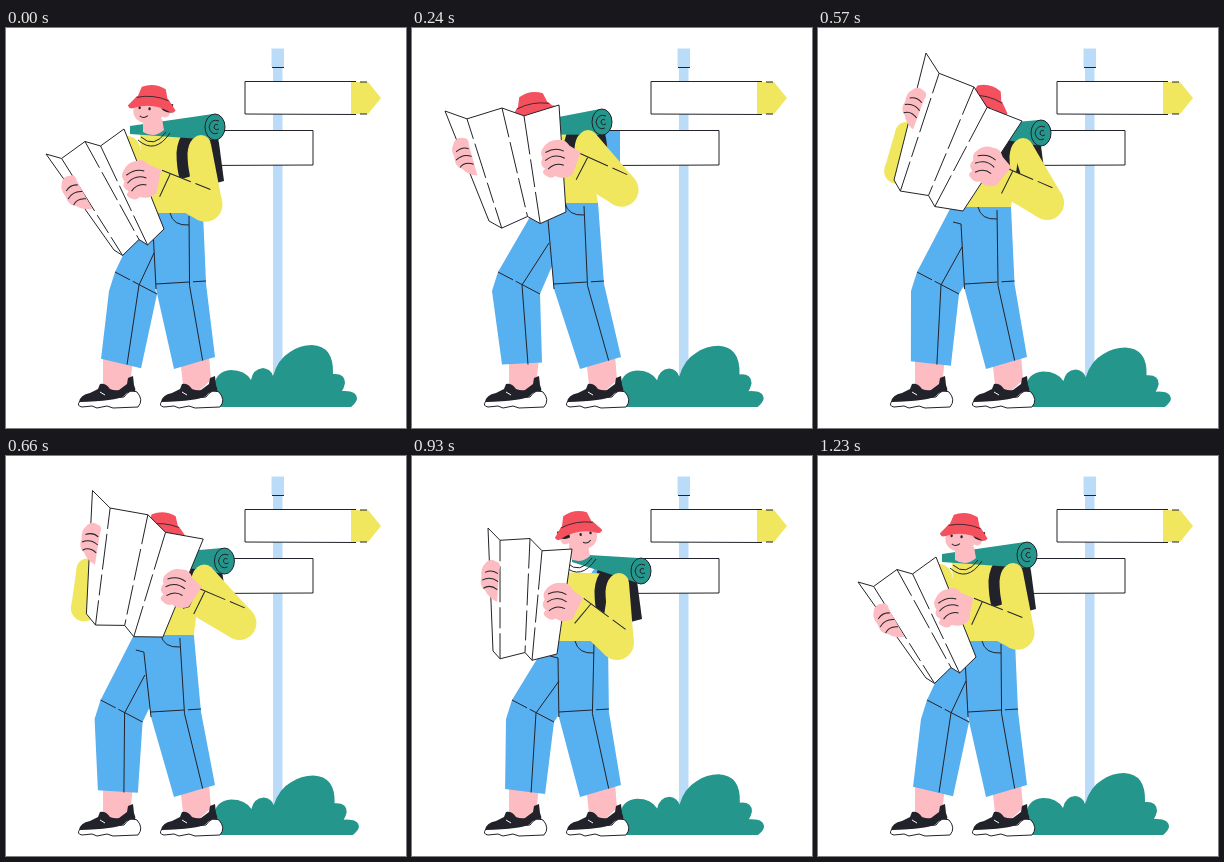
These frames come from a looping animation (400 px wide and 400 px high, 1260 ms). An HTML page with a canvas:

```html
<!DOCTYPE html>
<html lang="en">
<head>
<meta charset="utf-8">
<style>
html, body { margin: 0; height: 100%; overflow: hidden; background: #fff; }
canvas { display: block; width: 400px; height: 400px; }
</style>
</head>
<body>
<canvas id="stage" width="400" height="400"></canvas>
<script>
const ctx = document.getElementById('stage').getContext('2d');
const LOOP = 1260, STEP = 30;
const INK = '#22232a', BLUE = '#57b0ef', SKIN = '#fcbcc1', YELLOW = '#f0e75f',
      TEAL = '#24968b', RED = '#f4505e', POST = '#bbdcf9', WHITE = '#fff';

// A few key poses: map corners and main joints; everything else follows from them.
// lean holds the knee's x, the head's angle and where the face looks (-1 left, 1 right).
const poses = [
  { time: 60, tl: [40, 126], tr: [118, 101], bl: [108, 222], br: [158, 201],
    head: [146, 77], shoulder: [195, 117], hip: [197, 185], lean: [130, 6, -1] },
  { time: 240, tl: [33, 83], tr: [147, 77], bl: [77, 193], br: [154, 184],
    head: [122, 84], shoulder: [176, 112], hip: [186, 175], lean: [107, -10, -1] },
  { time: 360, tl: [122, 27], tr: [199, 95], bl: [74, 150], br: [131, 180],
    head: [156, 77], shoulder: [202, 120], hip: [197, 180], lean: [122, 40, -1] },
  { time: 570, tl: [108, 25], tr: [204, 93], bl: [76, 152], br: [145, 183],
    head: [167, 77], shoulder: [205, 120], hip: [193, 179], lean: [120, 14, 0] },
  { time: 780, tl: [61, 56], tr: [180, 69], bl: [86, 172], br: [169, 178],
    head: [140, 75], shoulder: [188, 116], hip: [182, 179], lean: [110, -5, 1] },
  { time: 930, tl: [76, 72], tr: [160, 93], bl: [81, 195], br: [145, 198],
    head: [166, 75], shoulder: [207, 127], hip: [196, 185], lean: [121, -10, 1] }
];
poses.push({ ...poses[0], time: 1170 });

// Monotone cubic curve through one value of every pose.
function sample(read, t) {
  const last = poses.length - 1;
  if (t <= poses[0].time || t >= poses[last].time) return read(poses[0]);
  const gap = i => poses[i + 1].time - poses[i].time;
  const slope = i => (read(poses[i + 1]) - read(poses[i])) / gap(i);
  const tangent = i => {
    if (i === 0 || i === last) return 0;
    const a = slope(i - 1), b = slope(i);
    return a * b > 0 ? 2 * a * b / (a + b) : 0;
  };
  let i = 0;
  while (t >= poses[i + 1].time) i++;
  const h = gap(i), u = (t - poses[i].time) / h, w = 1 - u;
  return read(poses[i]) * (1 + 2 * u) * w * w + tangent(i) * h * u * w * w
       + read(poses[i + 1]) * u * u * (3 - 2 * u) - tangent(i + 1) * h * u * u * w;
}

const rad = degrees => degrees * Math.PI / 180;
const mix = (a, b, u) => [a[0] + (b[0] - a[0]) * u, a[1] + (b[1] - a[1]) * u];
const add = (p, x, y) => [p[0] + x, p[1] + y];
const polar = (p, r, degrees) => add(p, r * Math.cos(rad(degrees)), r * Math.sin(rad(degrees)));
const heading = (a, b) => Math.atan2(b[1] - a[1], b[0] - a[0]) * 180 / Math.PI;
const distance = (a, b) => Math.hypot(b[0] - a[0], b[1] - a[1]);

// Elbow between a and b for the given bone lengths.
function bend(a, b, upper, lower) {
  const d = distance(a, b), cos = (upper ** 2 + d * d - lower ** 2) / (2 * upper * d);
  return polar(a, upper, heading(a, b) - Math.acos(Math.max(-1, Math.min(1, cos))) * 180 / Math.PI);
}

function poseAt(t) {
  const p = { time: t };
  for (const name in poses[0]) {
    if (name !== 'time') p[name] = poses[0][name].map((_, k) => sample(pose => pose[name][k], t));
  }
  [p.kneeX, p.headTilt, p.turn] = p.lean;
  p.handTilt = 10 + (heading(p.tr, p.br) - 90) / 2;
  p.hand = add(mix(p.tr, p.br, .51), -3, 0);
  p.wrist = polar(p.hand, 24, p.handTilt + 15);
  p.elbow = bend(p.shoulder, p.wrist, 60, 45);
  p.backTilt = heading(p.tl, p.bl) - 82;
  p.backHand = mix(p.tl, p.bl, .43);
  p.backShoulder = add(p.shoulder, -74, 4);
  p.backElbow = bend(p.backShoulder, p.backHand, 55, 65);
  return p;
}

function paint(path, fill, stroke, width = 1) {
  if (fill) { ctx.fillStyle = fill; ctx.fill(path); }
  if (stroke) { ctx.strokeStyle = stroke; ctx.lineWidth = width; ctx.stroke(path); }
}
const shape = (d, fill, stroke, width) => paint(new Path2D(d), fill, stroke, width);
const poly = (pts, fill, stroke) => shape('M' + pts.join('L') + 'Z', fill, stroke);
const line = (pts, color = INK) => shape('M' + pts.join('L'), null, color);

function dashed(pts, pattern) {
  ctx.setLineDash(pattern);
  line(pts);
  ctx.setLineDash([]);
}
function ellipse([x, y], rx, ry, fill, stroke) {
  const path = new Path2D();
  path.ellipse(x, y, rx, ry, 0, 0, 7);
  paint(path, fill, stroke);
}
function at([x, y], degrees, draw, sx = 1, sy = 1) {
  ctx.save();
  ctx.translate(x, y);
  ctx.rotate(rad(degrees));
  ctx.scale(sx, sy);
  draw();
  ctx.restore();
}
// Tapered tube with round ends.
function limb(a, ra, b, rb, color) {
  const turn = heading(a, b) + 90;
  poly([polar(a, ra, turn), polar(b, rb, turn), polar(b, -rb, turn), polar(a, -ra, turn)], color);
  ellipse(a, ra, ra, color);
  ellipse(b, rb, rb, color);
}

function signpost() {
  shape('M267,40H276.500V352H267Z', POST);
  shape('M265.500,20.500H278V39H265.500Z', POST);
  line([[266, 39.5], [278, 39.5]]);
  shape('M239,54H362V86H239Z', WHITE);
  shape('M345,54H362L375,70L362,86H345Z', YELLOW);
  shape('M350,53.500H239V86L350,86.500M354,54H361M354,86H361', null, INK);
  shape('M184,103H307V137H184Z', WHITE);
  shape('M208,103H190L177,120L190,137H208Z', BLUE);
  shape('M196,102.500H307V137L196,137.500', null, INK);
}

function bush({ time }) {
  const sway = 1 - Math.cos(2 * Math.PI * time / LOOP);
  at([214, 379], 0, () => shape('M0,0Q-6,-6 -6,-19Q-5,-36 11,-37Q25,-37 31,-27' +
    'Q33,-38 43,-39Q51,-38 53,-31Q58,-48 70,-55Q80,-62 92,-62Q114,-61 113,-33' +
    'Q125,-34 125,-24Q124,-19 122,-16Q137,-17 137,-8Q136,-4 131,0Z', TEAL),
    1 + .007 * sway, 1 - .02 * sway);
}

function shoe(x) {
  at([x, 0], 0, () => {
    shape('M74,373Q70,378 76,379L86,378L91,380L101,378L107,380L132,379Q138,372 131,364Q124,360 118,369Z', WHITE, INK);
    shape('M122,350L127,348L128,357Q130,361 129,364Q122,362 118,368Q110,373 73,374Q74,367 84,365' +
      'L92,361L94,356Q100,355 104,361Q109,363 113,362L121,356Z', INK);
    line([[94, 364], [99, 367]], WHITE);
  });
}

function trousers({ hip, kneeX }) {
  const sway = kneeX - 107;
  const waist = add(hip, -60, 0), fly = add(hip, -50, 17);
  const crotch = [140 + sway * .4, Math.min(262, 238 + sway * 1.6)];
  const knee = [kneeX, 255], ankle = [110 + sway * .22, 335.5], tilt = sway * .25 - 1;
  const kneeOut = add(knee, -21, -11), kneeIn = add(knee, 21, 11);
  const innerKnee = [142 + sway * .35, 261], outerKnee = add(innerKnee, 50, -5);
  const cuff = [[209, 329], [168, 341]];

  poly([[97, 330], [127, 330], [124, 358], [110, 364], [97, 358]], SKIN);
  poly([[174, 330], [203, 327], [205, 352], [192, 364], [177, 357]], SKIN);
  shoe(0);
  shoe(82);
  poly([waist, hip, outerKnee, ...cuff, innerKnee, crotch], BLUE);
  poly([waist, kneeOut, add(kneeOut, -6, 19), add(ankle, -20, -tilt), add(ankle, 20, tilt),
    kneeIn, crotch, fly], BLUE);
  dashed([kneeOut, kneeIn], [17, 3, 40]);
  dashed([add(innerKnee, 0, -5), add(outerKnee, 0, -3)], [33, 4]);
  line([add(hip, -49, 40), add(knee, 3, 2), add(ankle, 6, 1)]);
  line([add(fly, -8, -2), fly, innerKnee]);
  line([add(hip, -14, 3), mix(innerKnee, outerKnee, .67), mix(...cuff, .3)]);
  at(hip, 0, () => shape('M-33,0Q-30,13 -14,12', null, INK));
}

function body({ shoulder, hip }) {
  at(shoulder, 0, () => shape('M-22,-12Q-14,-21 0,-21Q15,-20 18,-2L23,36L8,40L-18,37Z', INK));
  poly([add(shoulder, -61, -11), add(shoulder, -2, -9), hip, add(hip, -60, 0)], YELLOW);
  at(shoulder, 0, () => shape('M3,-14Q-17,-16 -19,8Q-19,22 -16,33', null, INK, 11));
}

function bedroll({ head, shoulder, turn }) {
  const end = add(shoulder, 18 + 4 * turn, -15 + 3 * turn);
  const start = [head[0] - 14 + 8 * turn, 102];
  poly([add(start, 0, -4), add(end, -2, -13), add(end, 0, 13), add(start, 0, 4)], TEAL);
  ellipse(end, 10, 13, TEAL, INK);
  at(end, 0, () => shape('M4,-6Q-4,-9 -6,0Q-4,9 3,6M3,-2Q-1,-4 -1,1Q1,4 4,2', null, INK));
}

function head(p) {
  const f = p.turn;
  at(p.head, 0, () => {
    shape('M-9,14H10L12,25Q2,34 -9,27Z', SKIN);
    shape('M-11,32Q2,44 14,27M-14,35Q3,50 18,28', null, INK);
  });
  at(p.head, p.headTilt, () => {
    ellipse([-14 * f, 5], 5, 6, SKIN);
    at([3 * f, 0], 0, () => shape('M-15,-2L-15,8Q-13,19 0,19Q13,19 15,8L15,-2Z', SKIN));
    at([-15 * f, 0], 0, () => shape('M-6,-3H6V5Q0,7 -5,3Z', INK));
    for (const x of [2, 12]) {
      ellipse([x * f, 4], 1.2, 1.5, INK);
      line([[x * f - 3, 0], [x * f + 2, -1]]);
    }
    at([7 * f, 12], 0, () => shape('M-4,0Q0,3 4,-1', null, INK));
    shape('M-16,-4L-12,-17Q0,-23 12,-17L16,-4Z', RED);
    shape('M-16,-7Q0,-11 16,-7L24,3Q22,7 18,5Q0,-3 -18,5Q-22,7 -24,3Z', RED);
    shape('M-16,-6Q0,-11 16,-6', null, INK, .8);
  });
}

function backArm({ backShoulder, backElbow, backHand }) {
  limb(backShoulder, 13, backElbow, 13, YELLOW);
  limb(backElbow, 13, mix(backElbow, backHand, .6), 11, YELLOW);
}

function frontArm({ shoulder, elbow, wrist }) {
  limb(shoulder, 10, elbow, 17, YELLOW);
  const length = distance(elbow, wrist);
  at(wrist, heading(elbow, wrist), () => {
    poly([[-length, -17], [-length, 17], [7, 13], [7, -13]], YELLOW);
    line([[0, -12], [0, 13]]);
    dashed([[9, 13], [-length + 2, 16]], [31, 5]);
  });
}

// Odd folds stick out towards the viewer.
function map({ tl, tr, bl, br }) {
  const tilt = heading(tl, tr);
  const edge = (a, b) => [0, 1, 2, 3, 4].map(i => {
    const point = mix(a, b, i / 4);
    return i % 2 ? polar(polar(point, -7, tilt), 9, tilt + 90) : point;
  });
  const top = edge(tl, tr), base = edge(bl, br);
  poly([...top, ...[...base].reverse()], WHITE, INK);
  for (const i of [1, 2, 3]) dashed([top[i], base[i]], [12 + 9 * i, 5, 40 - 4 * i, 5]);
}

function hands(p) {
  at(p.backHand, p.backTilt, () => {
    shape('M-7,-16Q-3,-23 4,-20Q10,-19 8,-12L9,20Q0,17 -4,10Q-11,6 -9,-3Q-11,-12 -7,-16Z', SKIN);
    shape('M-6,-8Q1,-12 7,-8M-8,0Q0,-5 8,0M-6,8Q0,3 8,8', null, INK);
  });
  at(p.hand, p.handTilt, () => {
    shape('M-18,-9Q-14,-18 -5,-19Q2,-22 8,-15L20,-10L15,13Q8,20 -2,17' +
      'Q-5,21 -11,18Q-17,16 -13,11Q-20,8 -17,1Q-21,-4 -18,-9Z', SKIN);
    shape('M-15,-5Q-6,-12 3,-9M-14,3Q-6,-6 5,-2M-10,11Q-4,3 5,5', null, INK);
  });
}

function frame(now) {
  const p = poseAt(Math.floor(now % LOOP / STEP) * STEP);
  ctx.fillStyle = WHITE;
  ctx.fillRect(0, 0, 400, 400);
  signpost();
  for (const part of [bush, backArm, trousers, body, bedroll, head, frontArm, map, hands]) part(p);
  requestAnimationFrame(frame);
}
requestAnimationFrame(frame);
</script>
</body>
</html>
```
